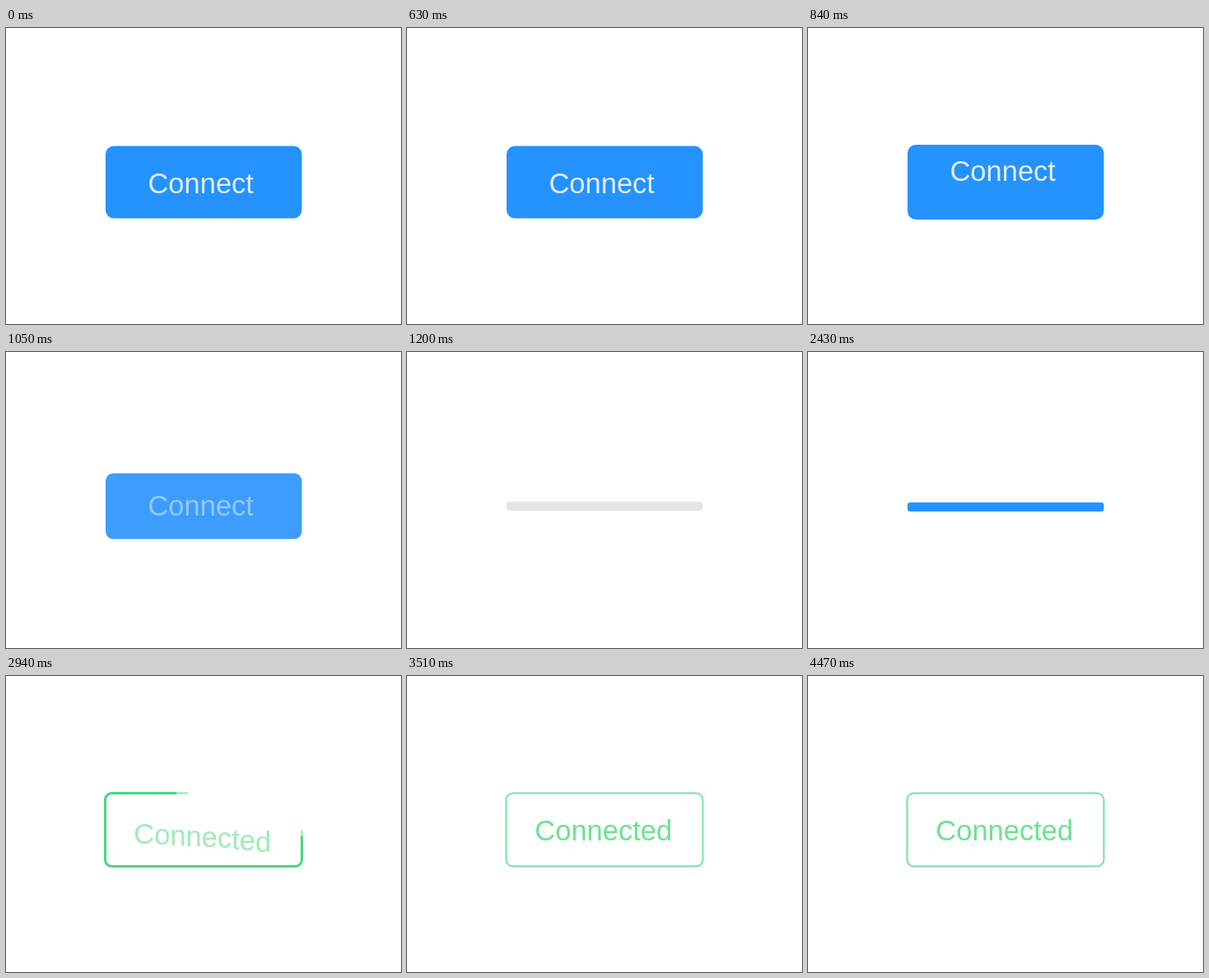
Write an HTML page with a canvas that moves like this. It is 480x360 px and loops after 4.5 s.

```html
<!DOCTYPE html>
<html lang="en">
<head>
<meta charset="utf-8">
<title>Connect button</title>
<style>
  html, body { margin: 0; width: 100%; height: 100%; overflow: hidden; background: #fff; }
  canvas { display: block; }
</style>
</head>
<body>
<canvas id="stage" width="480" height="360"></canvas>
<script>
const ctx = document.getElementById('stage').getContext('2d');
const LOOP = 4500;
const LEFT = 121, WIDTH = 238.5, MID_Y = 187.5, BASELINE = 200;
const BLUE = [36, 146, 255], GREY = [229, 229, 229];
const FONT = '34.5px "Liberation Sans", Arial, sans-serif';

const progress = (t, start, end) => Math.min(1, Math.max(0, (t - start) / (end - start)));
const mix = (a, b, k) => a + (b - a) * k;
const rgb = (a, b = a, k = 0) => `rgb(${a.map((v, i) => Math.round(mix(v, b[i], k)))})`;
const easeOut = (u, power) => 1 - (1 - u) ** power;
const backIn = u => 4.75 * u ** 3 - 3.75 * u ** 2;

// Outline that runs clockwise from the middle of the right side
const [x0, y0, x1, y1, r] = [120.5, 142.5, 359.5, 231.5, 8];
const outline = new Path2D();
outline.moveTo(x1, MID_Y);
outline.arcTo(x1, y1, x0, y1, r);
outline.arcTo(x0, y1, x0, y0, r);
outline.arcTo(x0, y0, x1, y0, r);
outline.arcTo(x1, y0, x1, y1, r);
outline.closePath();
const PERIMETER = 2 * (x1 - x0 + y1 - y0) - (8 - 2 * Math.PI) * r;

function bar(width, height, radius, color) {
  if (width <= 0 || height <= 0) return;
  ctx.fillStyle = color;
  ctx.beginPath();
  ctx.roundRect(LEFT, MID_Y + 0.5 - height / 2 - 0.5, width, height, Math.min(radius, width / 2, height / 2));
  ctx.fill();
}

function button(t) {
  const squash = backIn(progress(t, 810, 1103));
  const height = 88 - 77 * squash;
  bar(WIDTH, height, mix(10, 4, Math.max(0, squash)), rgb(BLUE, GREY, progress(t, 1030, 1190)));

  const arc = (t - 891) / 171;
  const lift = 15.4 * Math.max(0, 1 - arc * arc);
  ctx.globalAlpha = 1 - progress(t, 990, 1120);
  ctx.fillStyle = '#e4edf6';
  ctx.fillText('Connect', 172.4, BASELINE + 0.5 - lift);
  ctx.globalAlpha = 1;
}

function loader(t) {
  const gone = progress(t, 2440, 2600);
  ctx.globalAlpha = 1 - gone;
  const fill = easeOut(progress(t, 1240, 2230), 2);
  ctx.save();
  ctx.translate(0, 1);
  if (fill < 1) bar(WIDTH, 10, 4, rgb(GREY));
  bar(WIDTH * fill, 11 * (1 - gone), 3, rgb(BLUE));
  ctx.restore();
  ctx.globalAlpha = 1;
}

function trace(from, to, alpha) {
  if (to <= from) return;
  ctx.globalAlpha = alpha;
  ctx.setLineDash([to - from, PERIMETER * 2]);
  ctx.lineDashOffset = -from;
  ctx.stroke(outline);
  ctx.setLineDash([]);
}

function border(t) {
  const drawn = easeOut(progress(t, 2560, 3370), 2);
  const thin = progress(t, 3200, 3420);
  ctx.strokeStyle = '#48d87f';
  ctx.lineWidth = mix(3, 2, thin);
  if (drawn === 1) {
    ctx.globalAlpha = mix(1, 0.75, thin);
    ctx.stroke(outline);
  } else if (drawn > 0) {
    const alpha = mix(1, 0.75, thin);
    const head = PERIMETER * drawn;
    const tip = Math.min(14, head / 2) * Math.min(1, (1 - drawn) * 4);
    trace(tip / 2, head - tip, alpha);
    trace(0, tip / 2, alpha * 0.45);
    trace(head - tip, head, alpha * 0.45);
  }
  ctx.globalAlpha = 1;
}

function connected(t) {
  ctx.globalAlpha = progress(t, 2650, 3090);
  ctx.fillStyle = '#6fe18f';
  let x = 155.3;
  [...'Connected'].forEach((letter, i) => {
    const start = 2598 + i * 23;
    const drop = 30 * (1 - easeOut(progress(t, start, start + 700), 3));
    ctx.fillText(letter, x, BASELINE + drop);
    x += ctx.measureText(letter).width;
  });
  ctx.globalAlpha = 1;
}

function draw(now) {
  const t = now % LOOP;
  ctx.fillStyle = '#fff';
  ctx.fillRect(0, 0, 480, 360);
  ctx.font = FONT;
  if (t < 1240) button(t);
  else if (t < 2600) loader(t);
  if (t > 2560) {
    border(t);
    connected(t);
  }
  requestAnimationFrame(draw);
}
requestAnimationFrame(draw);
</script>
</body>
</html>
```
